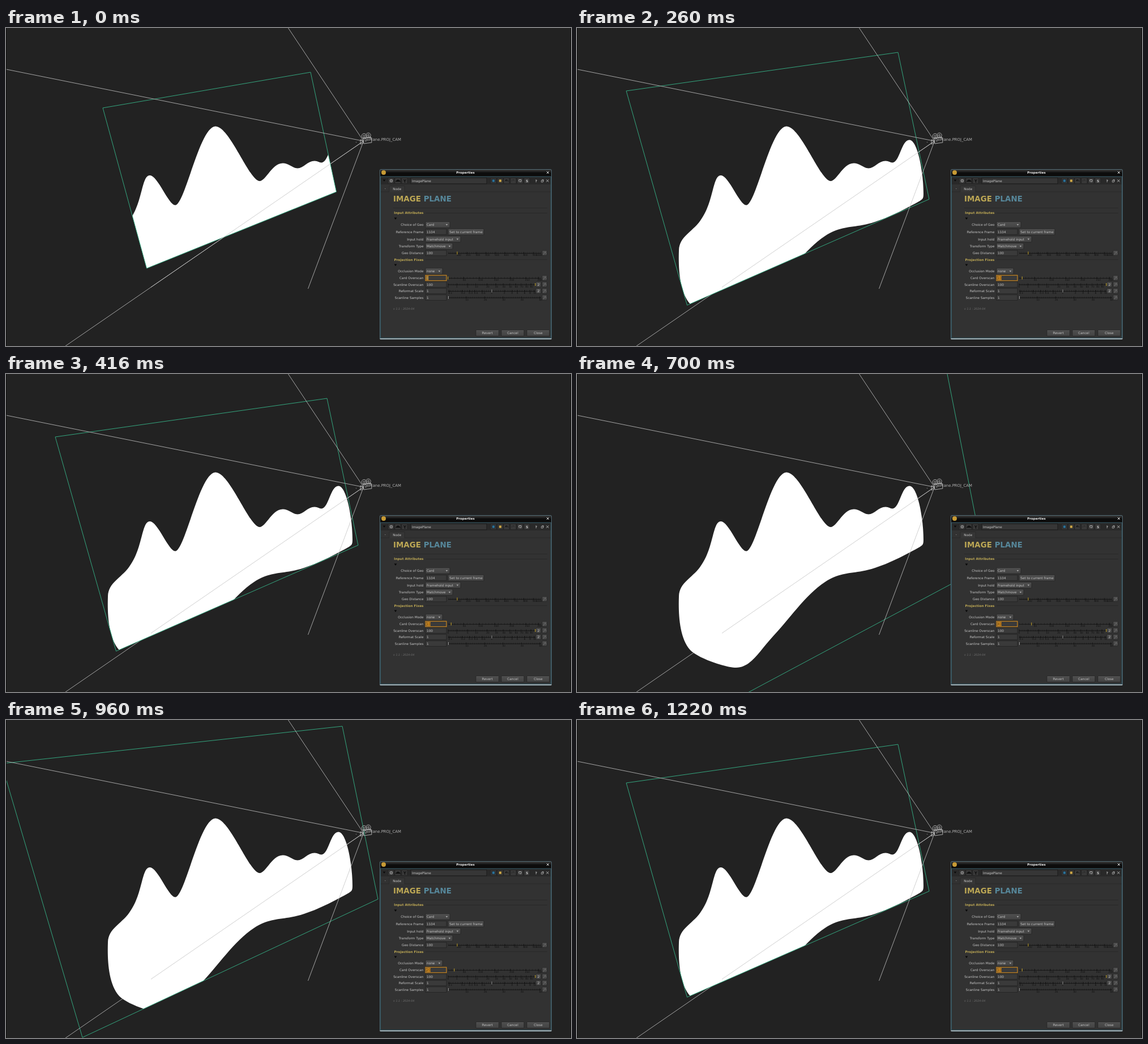
These frames come from a looping animation (998x561 px, 1.46 s). An HTML page:

```html
<!DOCTYPE html>
<html lang="en">
<head>
<meta charset="utf-8">
<title>Image plane overscan</title>
<style>
html, body { margin: 0; height: 100%; overflow: hidden; background: #222; }
svg { display: block; width: 100vw; height: 100vh; }
text { font: 5.75px "DejaVu Sans", sans-serif; fill: #c6c6c6; white-space: pre; }
.bold { font-weight: bold; }
.gold { fill: #bba654; }
.rays { stroke: #c4c4c4; stroke-width: .8; fill: none; }
.icon { stroke: #b8b8b8; stroke-width: .9; fill: none; }
.tiny { font-size: 4.3px; fill: #111; }
</style>
</head>
<body>
<svg viewBox="0 0 998 561">
  <defs>
    <clipPath id="clip"><polygon class="card"/></clipPath>
    <linearGradient id="key" x2="0" y2="1"><stop stop-color="#505050"/><stop offset="1" stop-color="#434343"/></linearGradient>
    <linearGradient id="bar" x2="0" y2="1"><stop stop-color="#3a3a3a"/><stop offset=".5" stop-color="#0c0c0c"/></linearGradient>
  </defs>
  <rect width="998" height="561" fill="#222"/>
  <path class="rays" d="M105 561L631.5 199.5"/>
  <path clip-path="url(#clip)" fill="#fff" d="M180 392C181 368 203 360 217 341C242 309 239 260 254 260
    C268 260 287 312.5 299 312.5C316 312 342 174 370 173.5C395 173.5 430 270 448 270
    C459 270 470 238.5 489 238.5C500 238.5 506 247.5 515 247.5C525 247.5 533 234.5 545 234.5
    C551 234.5 553 237.5 557 237.5C570 237.5 573 197.5 587 197.5C602 197.5 612 256 612 292
    C612 301 611 302 603 306.5C573 323 535 343 500 348.5C477 352 461 352 438 367
    C403 390 373 435 346 463C322 489 307 518 281 518C262 518 213 501 200 487C180 465 179 420 180 392Z"/>
  <polygon class="card" fill="none" stroke="#36b488" stroke-width=".9"/>
  <path class="rays" d="M0 72.8L631.5 199.5L498.5 0M256 457.3L631.5 199.5L533.5 460"/>
  <text x="698" y="198.8" text-anchor="end" style="font-size:6.9px;fill:#b0b0b0">gePlane.PROJ_CAM</text>
  <g class="icon">
    <circle cx="632.5" cy="190.5" r="4.2"/><circle cx="640" cy="189.3" r="4.2"/>
    <circle cx="632.5" cy="190.5" r="1.5"/><circle cx="640" cy="189.3" r="1.5"/>
    <path d="M631 195L645 193L646 202L632 204ZM626 197L631 199V203L626 205ZM629 194L643 192L645 193M618 201.5h1"/>
  </g>
  <path d="M.5 0V561M997.5 0V561" stroke="#0c0c0c"/>
  <g id="panel"></g>
</svg>
<script>
const $ = s => document.querySelector(s);
const parts = [];
const add = s => parts.push(s);
const rect = (x, y, w, h, fill, more = '') =>
  add(`<rect x="${x}" y="${y}" width="${w}" height="${h}" fill="${fill}" ${more}/>`);
const path = (d, stroke, more = 'fill="none"') => add(`<path d="${d}" stroke="${stroke}" ${more}/>`);
const text = (x, y, s, more = '') => add(`<text x="${x}" y="${y}" ${more}>${s}</text>`);
const END = 'text-anchor="end"', MID = 'text-anchor="middle"';
const arrow = (x, y, r, fill) => path(`M${x - r} ${y - r * .6}h${2 * r}l${-r} ${r * 1.4}z`, 'none', `fill="${fill}"`);

const label = (y, s) => text(737.5, y + 2, s, END);
const key = (x, y, w, h = 10.5, fill = 'url(#key)') =>
  rect(x, y - h / 2, w, h, fill, 'rx="1" stroke="#222" stroke-width=".7"');
function button(x, y, w, s) {
  key(x, y, w, 11);
  text(x + w / 2, y + 2.1, s, MID);
}
function choice(y, name, value, w) {
  label(y, name);
  key(741, y, w);
  text(743, y + 2.1, value);
  arrow(741 + w - 5.5, y, 1.8, '#b0b0b0');
}
function field(y, name, value) {
  label(y, name);
  rect(741, y - 4.8, 37, 9.6, '#3a3a3a', 'stroke="#222" stroke-width=".8"');
  text(743, y + 2.1, value);
}
const handle = (x, y, id = '') => rect(x - .6, y - 2.5, 1.2, 5, '#b79a2e', id);
function slider(y, name, value, place, marks, gap, link) {
  field(y, name, value);
  const end = link ? 935 : 945;
  path(`M781 ${y + .5}H${end}`, '#161616');
  path(`M781 ${y}H${end}`, '#161616', `stroke-width="3" stroke-dasharray=".6 ${gap}"`);
  for (const m of marks) {
    const x = place(m);
    path(`M${x} ${y - 2}v4`, '#111', 'stroke-width=".7"');
    text(x - 1.5, y + 5.2, m, 'class="tiny"');
  }
  if (link) {
    key(936, y, 9, 9);
    text(940.5, y + 2.1, 2, MID);
  }
  key(947, y, 8.5, 9);
  path(`M948.5 ${y + 2.5}q2 0 2.5 -2.5t2 -1.5l1.5 3`, '#777', 'fill="none" stroke-width=".7"');
}
const range = (n, step) => Array.from({length: n}, (_, i) => (i + 1) * step);

// Window frame and title bar
rect(660.5, 249.5, 303, 299.5, '#323232', 'rx="1.5" stroke="#55707b" stroke-width=".9"');
rect(661, 250, 302, 11.5, 'url(#bar)');
rect(661.7, 262.3, 300.6, 284.5, 'none', 'stroke="#2d5a6a" stroke-width=".8"');
path('M660.5 548.3H963.5', '#d3e4ea', 'stroke-width="1.3"');
add('<circle cx="667" cy="255" r="4" fill="#c79a35"/>');
text(811.5, 257.2, 'Properties', MID + ' class="bold" style="font-size:5.5px;fill:#eee"');
path('M955 253l4 4m0 -4l-4 4', '#ddd');

// Node toolbar
rect(662.3, 263, 299.4, 13, '#292929');
arrow(668, 269, 2.3, '#0a0a0a');
for (const x of [680, 692, 704, 861, 873, 884, 896, 908, 920]) key(x - 5, 269.5, 10, 10, '#383838');
add('<g class="icon"><circle cx="680.5" cy="269.5" r="2.3"/><circle cx="680.5" cy="269.5" r=".5"/></g>');
path('M689 270.5q3.5 -5 7 0zM704.5 273v-3l-2 -3m2 3l2 -3', '#111', 'fill="#111" stroke-width="1.3"');
rect(715, 264.3, 134, 10.5, '#363636', 'stroke="#191919" stroke-width=".8"');
text(717, 271.6, 'ImagePlane');
rect(858.5, 267, 5, 5, '#2d7197', 'stroke="#111" stroke-width=".6"');
rect(870.5, 267, 5, 5, '#c9a54a', 'stroke="#111" stroke-width=".6"');
path('M882 269q4 -2.5 5 1.5m-5 -1.5l2 -2m-2 2l2.5 1', '#111');
path('M898 269q-4 -2.5 -5 1.5m5 -1.5l-2 -2', '#2a2a2a');
path('M906 271v-3.5h4v3.5h-3', '#aaa');
text(920.3, 271.7, 'S', MID + ' class="bold"');
text(936.5, 271.7, '?', MID + ' class="bold"');
path('M945.5 271v-2h3v3h-3zM947 269v-1.5h2.5v3', '#bbb', 'fill="none" stroke-width=".7"');
path('M954.5 267.5l4 4m0 -4l-4 4', '#bbb');

// Tab and page
path('M662 289H677V278.5H704V289H962', '#262626', 'fill="none" stroke-width=".8"');
rect(677.4, 279, 26.2, 10.5, '#363636');
text(690.7, 285.6, 'Node', MID);
path('M669 283.5h1.5', '#777');
text(684, 306.2, 'IMAGE <tspan fill="#56879a">PLANE</tspan>', 'class="bold gold" style="font-size:13.45px"');
path('M684 317.5H956M741 326.5H956M741 408.8H956', '#282828', 'stroke-width=".8"');
text(737.5, 328.3, 'Input Attributes', END + ' class="bold gold"');
text(737.5, 410.6, 'Projection Fixes', END + ' class="bold gold"');
arrow(688, 336, 2.4, '#080808');
arrow(688, 418, 2.4, '#080808');

choice(347, 'Choice of Geo', 'Card', 43);
field(359.5, 'Reference Frame', '1104');
button(781, 359.7, 63, 'Set to current frame');
choice(372.5, 'Input hold', 'Framehold input', 62);
choice(385, 'Transform Type', 'Matchmove', 48);
choice(429, 'Occlusion Mode', 'none', 30);

const cardX = v => 780.8 + v * .55;
slider(397, 'Geo Distance', '100', v => 780.5 + v * .168, range(9, 100), 2.8);
text(936, 402.2, '1000', 'class="tiny"');
slider(441, 'Card Overscan', '', cardX, [...range(5, 50), 290], 4.9);
slider(452.5, 'Scanline Overscan', '100', v => 781 + 15.4 * Math.sqrt(v), [0, 1, 5, ...range(9, 10)], 2.6, true);
slider(464, 'Reformat Scale', '1', v => 858 + 75 * Math.log10(v), [.1, .2, .3, .4, .6, 1, 2, 3, 4, 6, 8, 10], 3.6, true);
slider(475.5, 'Scanline Samples', '1', v => 780.5 + v * 3.25, range(5, 10), 2.7);
handle(797, 397);
handle(935, 452.5);
rect(857.5, 461.5, 1, 5, '#999');
rect(781, 473, 1, 5, '#999');
handle(0, 441, 'id="knob"');

// Focused number field
rect(741, 436.2, 37, 9.6, '#3a3a3a', 'stroke="#d88e1f" stroke-width="1.1"');
rect(742.3, 437.5, 7.5, 7, '#d88e1f', 'id="select"');
text(742.6, 443.1, '', 'id="value"');

text(684, 496.6, 'v 1.1 : 2024-04', 'style="font-size:4.9px;font-style:italic;fill:#707070"');
button(830, 538, 40.5, 'Revert');
button(875, 538, 40, 'Cancel');
button(920, 538, 40, 'Close');
$('#panel').innerHTML = parts.join('');

// Card corners for each overscan value
const cards = {
  0: '171,141 538,78 583.5,289 248.5,424',
  10: '87,111 567,43 622,302 194.5,489',
  20: '-8,77 594,11 657,316 135,560',
  40: '-225,0 645.5,-43 721,338.5 0,723'
};
const steps = [[0, 0], [260, 10], [520, 20], [700, 40], [960, 20], [1220, 10]];
let shown;
function draw() {
  const t = performance.now() % 1460;
  const v = steps.findLast(s => s[0] <= t)[1];
  if (v !== shown) {
    shown = v;
    document.querySelectorAll('.card').forEach(c => c.setAttribute('points', cards[v]));
    $('#knob').setAttribute('x', cardX(v) - .6);
    $('#select').setAttribute('width', v ? 7.5 : 4);
    $('#value').textContent = v;
    $('#value').style.fill = v ? '#3a2a10' : '#2f6c92';
  }
  requestAnimationFrame(draw);
}
draw();
</script>
</body>
</html>
```
